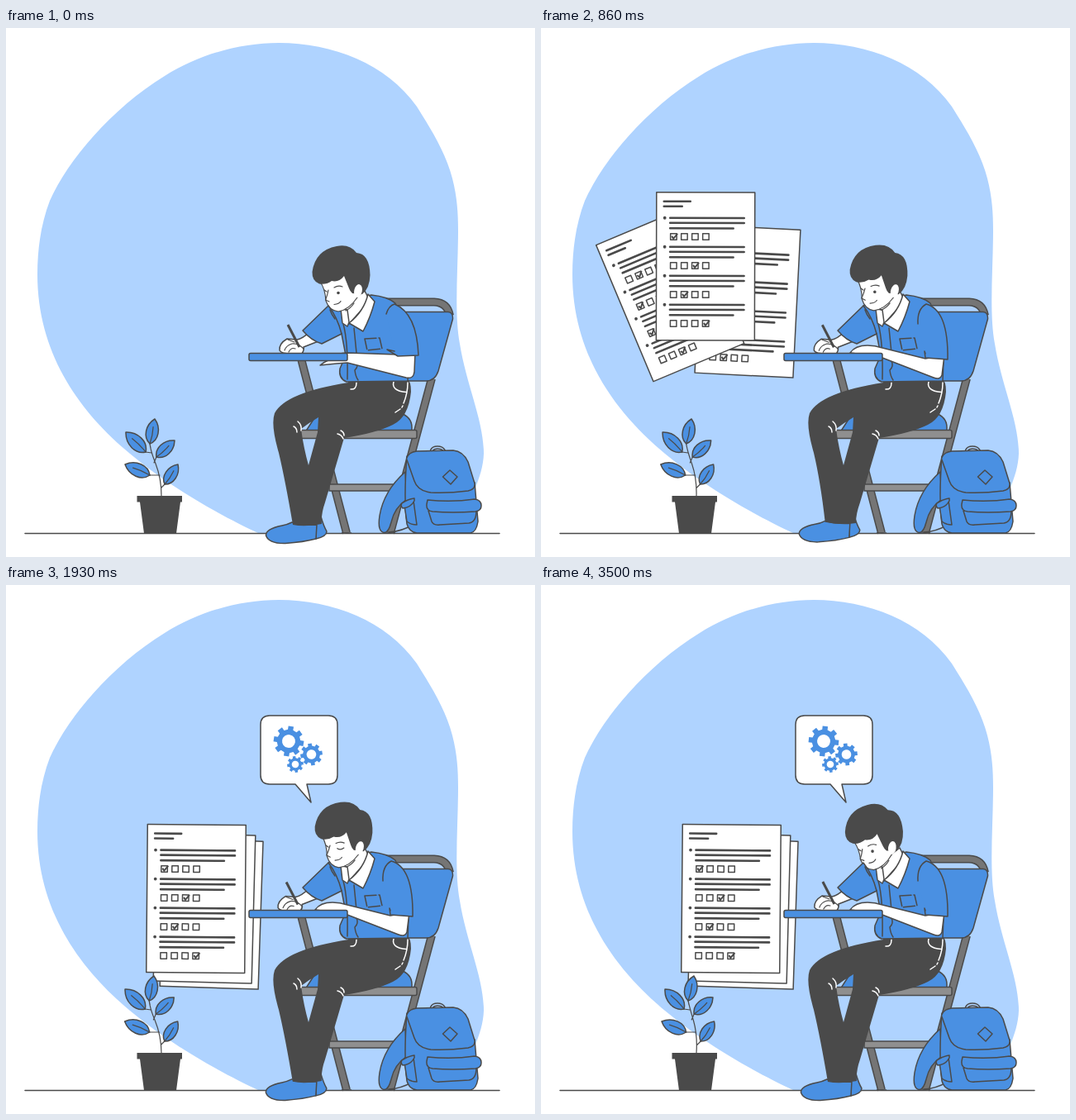
Recreate the animation shown at these times as an HTML page. Size 640 by 640 pixels, loop 3570 ms.

```html
<!DOCTYPE html>
<html lang="en">
<head>
<meta charset="utf-8">
<title>Student at a desk</title>
<style>
html, body { margin: 0; width: 100%; height: 100%; overflow: hidden; background: #fff; }
svg { display: block; width: 100vw; height: 100vh; }
.l { fill: none; stroke: #4a4a4a; stroke-width: 1.5; stroke-linecap: round; stroke-linejoin: round; }
.thin { stroke-width: 1.2; }
.b { fill: #4a90e2; }
.w { fill: #fff; }
.d { fill: #4a4a4a; }
.g { fill: #8f8f8f; }
.s { fill: none; stroke: #fff; stroke-width: 1.5; stroke-linecap: round; }
.t { fill: none; stroke: #4a4a4a; stroke-width: 2.6; stroke-linecap: round; }
.k { fill: none; stroke: #4a4a4a; stroke-width: 2; }
.tube { fill: none; stroke: #4a4a4a; stroke-width: 10; }
.tube2 { fill: none; stroke: #757575; stroke-width: 7; }
</style>
</head>
<body>
<svg viewBox="0 0 640 640">
  <path fill="#afd3ff" d="M305 611C262 591 200 557 150 515C90 465 38 395 38 298C38 265 43 235 53 209C75 160 127 98 192 58C235 31 285 18 330 18C395 18 460 43 497 95C512 119 532 150 540 182C546 205 547 225 547 245C547 290 542 345 549 382C557 432 578 475 578 515C577 545 560 570 545 611Z"/>
  <path class="l" d="M23 611.5H597"/>

  <g id="papers"></g>
  <g id="plant"></g>
  <path class="d" d="M158.5 566H213V573.5H211L206 611.5H167L162 573.5H158.5Z"/>

  <g id="bubble">
    <path class="l w" d="M319 158H390Q401 158 401 169V230Q401 241 390 241H364L369 263L350 241H319Q308 241 308 230V169Q308 158 319 158Z"/>
    <g id="gears"></g>
  </g>

  <g id="chair">
    <path class="tube" d="M455 331.5H518Q534 332 537 348M515 424L465 611M357.5 402L412 611"/>
    <path class="tube2" d="M455 331.5H518Q534 332 537 348M515 424L465 611M357.5 402L412 611"/>
    <path class="l" d="M406.5 611H417.5M459.5 611H470.5"/>
    <rect class="l g" x="391" y="552" width="84" height="8"/>
    <path class="l b" d="M470 343.5H535Q541 344 540.5 352L523 415Q519 427 508 427H470Z"/>
    <path class="l b" d="M362 489L373 472Q379 465 400 465H475Q491 470 491 483V489Z"/>
    <rect class="l g" x="355" y="486.5" width="142" height="10" rx="2"/>
  </g>

  <g id="bag">
    <path class="l b" d="M483 537Q457 560 452 590Q449 610 458 610.5Q463 610 466 598Q470 580 485 570Z"/>
    <path class="l" d="M463 610Q479 609 492 601"/>
    <path class="l" d="M513 513Q514 506 522 506Q530 506 532 513M516 512Q518 509 522 509Q527 509 529 512"/>
    <path class="l b" d="M485 518Q481 570 485 600Q488 610 497 611H562Q569 610 571 597L567 550Z"/>
    <path class="l b" d="M484.5 521Q487 513 497 512L541 511Q553 512 559 525L567 551Q568 558 559 560Q535 563 514 562Q498 560 494 548Z"/>
    <path class="l" d="M537 535L546 543L538 552L528.5 543Z"/>
    <path class="l b" d="M511 584L515 597Q517 602 525 601L560 599Q569 598 569 584Z"/>
    <path class="l b" d="M510 571Q540 574 567 570Q575 571 575 578Q575 584 568 585Q540 587 516 585Q508 584 509 576Z"/>
    <path class="l b" d="M482 578L485 597Q490 601 497 601L493 572Z"/>
    <path class="l b" d="M479 575Q486 570 494 569L494 572Q490 580 480 581Q477 578 479 575Z"/>
  </g>

  <g id="shoe">
    <path class="l b" d="M375 601L381 591Q384 602 388 609Q388 615 375 618Z"/>
    <path class="l b" d="M346 598Q340 601 334 602Q314 606 314.5 614Q318 624 338 623.5Q360 622 375 618L376 601Q360 602 346 598Z"/>
  </g>
  <path class="d" id="legs" fill-rule="evenodd"/>
  <path class="s" d="M348 482Q352 484 352 489M353 476Q358 480 357 487M401 491Q406 492 408 497M405 487Q409 489 409 493M469 428Q466 439 484 440.5M486 429Q486 442 481 454M480 457L479 459M477 461L471 465M417 437Q424 438 424 429"/>

  <path class="l b" d="M390 336L442 323Q462 325 471 333L488 375L486 427L412 428Q402 424 404 412L411 396L406 370Z"/>
  <path class="l" d="M408 358Q414 380 413 425M421 363L424 393M424 403Q427 409 422 414Q423 422 426 426"/>
  <path class="l" stroke-dasharray="14 3" d="M434 376L452 375L455 388L437 390Z"/>
  <path class="l w" d="M411 336L434 318L440 330L415 358L407 352Z"/>
  <path class="l w" d="M405 340L407 357L413 361L415 356L413 341Z"/>
  <path class="l w" d="M438 322L446 331Q441 350 432 367L415 357Q433 343 438 322Z"/>

  <g id="head">
    <path class="l w thin" d="M380 307Q386 315 387 330Q391 342 402 343Q415 341 425 326L428 304L400 296Z"/>
    <path class="d" d="M379 309.5Q370 306 370.5 295Q374 269 400 264Q416 261 424 272Q440 273 440.5 299Q440 315 431 322L419 321Q416 318 415 315L409 300Q403 308 394 306Q387 311 379 309.5Z"/>
    <ellipse class="w" cx="426" cy="318" rx="4.8" ry="8" transform="rotate(12 426 318)"/>
    <path class="l thin" d="M390 317Q389 323 386.5 329L391 331M397 314Q402 311 407 313M385 317L388 319M397 334.5Q403 334 405 330.500M421 333Q417 339 411 342"/>
    <circle class="d" id="open" cx="402" cy="320.5" r="1.8"/>
    <path class="l thin" id="shut" d="M399 320Q403 322.500 407 319"/>
  </g>

  <path class="l w" id="arm"/>
  <path class="l b" id="sleeve"/>

  <g id="hand">
    <path class="l w" d="M368 367Q359 376 352 377L340 376Q330 382 331 390Q333 394 345 394H358Q361 390 360 386L383 377Z"/>
    <path d="M341 359L355 386" stroke="#4a4a4a" stroke-width="3"/>
    <path class="l thin" d="M337 390Q339 384 346 382Q353 381 360 388M342 392Q345 386 350 388M341 377L349 380"/>
  </g>
  <path class="l b" d="M390 336L359 366Q369 378 382 382L406 370Q401 350 390 336Z"/>
  <path class="l" d="M392 341Q394 347 398 352"/>
  <rect class="l b" x="294" y="393.5" width="119" height="9" rx="2"/>
</svg>
<script>
const LOOP = 3570, TAU = 2 * Math.PI;
const $ = id => document.getElementById(id);
const put = (id, name, value) => $(id).setAttribute(name, value);
const move = (id, value) => put(id, 'transform', value);
const lerp = (a, b, k) => a + (b - a) * k;
const mix = (a, b, k) => a.map((v, i) => lerp(v, b[i], k));
const span = (t, from, to) => Math.min(1, Math.max(0, (t - from) / (to - from)));

// 0 to 1 with soft ends
function ease(t, from, to) {
  const k = span(t, from, to);
  return k * k * (3 - 2 * k);
}

// Scale from 0 to 1 that overshoots by an amount set by c
function pop(t, from, length, c) {
  const k = span(t, from, from + length) - 1;
  return 1 + (c + 1) * k ** 3 + c * k * k;
}

// Blends two paths of the same structure.
function blend(from, to, k) {
  const nums = to.match(/[\d.]+/g);
  let i = 0;
  return from.replace(/[\d.]+/g, v => lerp(+v, +nums[i++], k).toFixed(2));
}

// Exam sheets: each goes from a fan to a lower fan to a stack; poses are centre and angle
const SHEETS = [
  { ticks: [0, 2, 3, 1], fan: [250, 267.4, 2.9], low: [250, 397.5, 2.9], stack: [248.6, 397.7, 1.9] },
  { ticks: [1, 0, 0, 2], fan: [157.9, 277.4, -29.6], low: [154.4, 369.2, -15.6], stack: [240, 391, 1.5] },
  { ticks: [0, 2, 1, 3], fan: [202, 256, 5.3], low: [196, 322.5, -5.3], stack: [230, 379.5, .5] }
];

function sheet(ticks) {
  let s = '<rect class="l w" width="119" height="179"/><path class="t" d="M9 11H41M9 17H31"/>';
  ticks.forEach((tick, q) => {
    const y = 31 + 35 * q;
    s += `<circle class="d" cx="10" cy="${y}" r="1.9"/>` +
      `<path class="t" d="M16.5 ${y}H106M16.5 ${y + 6}H106M16.5 ${y + 12.5}H93"/>`;
    for (let i = 0; i < 4; i++)
      s += `<rect class="l" x="${17 + 13 * i}" y="${y + 19}" width="7.5" height="7.5"/>`;
    s += `<path class="k" d="M${18.5 + 13 * tick} ${y + 22}l2 3l5 -6"/>`;
  });
  return s;
}
$('papers').innerHTML = SHEETS.map((p, i) =>
  `<g id="paper${i}"><g transform="translate(-59.5 -89.5)">${sheet(p.ticks)}</g></g>`).join('');

function drawSheets(t) {
  const fall = ease(t, 640, 1090), gather = ease(t, 1190, 1880);
  SHEETS.forEach(({ fan, low, stack }, i) => {
    const [x, y, a] = mix(mix(fan, low, fall), stack, gather);
    // A sheet that turns further swings lower on its way
    const dip = .5 * Math.abs(stack[2] - low[2]) * Math.sin(Math.PI * gather);
    move('paper' + i, `translate(${x} ${y + dip}) rotate(${a}) scale(${pop(t, 100 + 100 * i, 340, 1.2)})`);
  });
}

// Gears: centre, radius, turn direction
const GEARS = [[342, 189, 18.5, 1], [369.5, 205, 13.5, -1], [350, 217, 10, -1]];

function gear(r) {
  const pts = [], hole = r * .43;
  for (let i = 0; i < 8; i++)
    for (const [turn, k] of [[-13, .77], [-10, 1], [10, 1], [13, .77]]) {
      const a = (i * 45 + turn) * Math.PI / 180;
      pts.push((r * k * Math.cos(a)).toFixed(2) + ' ' + (r * k * Math.sin(a)).toFixed(2));
    }
  return `M${pts.join('L')}ZM${hole} 0A${hole} ${hole} 0 1 0 ${-hole} 0A${hole} ${hole} 0 1 0 ${hole} 0Z`;
}
$('gears').innerHTML = GEARS.map((g, i) =>
  `<path id="gear${i}" class="b" fill-rule="evenodd" d="${gear(g[2])}"/>`).join('');

function drawBubble(t) {
  move('bubble', `translate(354.5 290) scale(${pop(t, 980, 440, 1.9)}) translate(-354.5 -290)`);
  GEARS.forEach(([x, y, , dir], i) =>
    move('gear' + i, `translate(${x} ${y}) rotate(${dir * (12 + (t - 1430) * .084)})`));
}

// Leaves at rest: base, joint on the stem, tip, and share of the sway
const LEAVES = [
  { base: [174, 503], joint: [175, 508], tip: [180, 473], share: 1 },
  { base: [169, 513], joint: [176, 514], tip: [145, 489], share: 1 },
  { base: [182, 519], joint: [179, 526], tip: [204, 499], share: .8 },
  { base: [174, 541], joint: [186, 541], tip: [144, 528], share: .4 },
  { base: [192, 552], joint: [188, 556], tip: [208, 528], share: .3 }
];
$('plant').innerHTML = '<path class="l thin" id="stem"/>' + LEAVES.map((_, i) =>
  `<path class="l b" id="leaf${i}"/><path class="l thin" id="vein${i}"/>`).join('');

function drawPlant(t) {
  const s = 4 * ease(t, 0, 640) - 10 * ease(t, 640, 1430) + 7 * ease(t, 1430, 2200) + 4 * ease(t, 2200, 3500);
  let stem = `M188 566Q${188 + s * .3} 545 ${181 + s * .7} 527Q${175 + s} 512 ${174 + s * .8} 503`;
  LEAVES.forEach(({ base, joint, tip, share }, i) => {
    const shift = s * share, bx = base[0] + shift * .8, by = base[1];
    const dx = tip[0] + shift - bx, dy = tip[1] - by, len = Math.hypot(dx, dy), w = len * .32;
    const at = (along, side) =>
      `${bx + dx * along - dy / len * side} ${by + dy * along + dx / len * side}`;
    put('leaf' + i, 'd', `M${at(0, 0)}C${at(.2, w)} ${at(.7, w)} ${at(1, 0)}` +
      `C${at(.7, -w)} ${at(.2, -w)} ${at(0, 0)}Z`);
    put('vein' + i, 'd', `M${at(0, 0)}Q${at(.35, 1.5)} ${at(.68, 0)}`);
    stem += `M${bx} ${by}L${joint[0] + shift * .8} ${joint[1]}`;
  });
  put('stem', 'd', stem);
}

// Arm below the desk, then resting on it
const ARM = ['M380 408Q385 404 390 402Q400 393 413 393L472 395L495 392L494 416Q493 425 484 423L413 405L400 406Z',
  'M374 393Q380 384 395 384Q404 384 413 387L465 400L488 396L485 420Q483 426 475 423L413 399L400 396Z'];
const SLEEVE = ['M460 346Q463 336 470 334Q497 345 499 396L474 397L461 389L470 391',
  'M456 358Q455 340 466 334Q493 341 492 401L465 399L464 391L465 394'];

const legs = tap => 'M414 429Q338 441 325 466Q320 480 330 514' +
  `Q338 548 ${347 - 3 * tap} ${601 - 3 * tap}Q361 ${604 - 2 * tap} ${382 - tap} ${600 - tap}` +
  'Q381 588 386 574L409 496Q448 490 468 480Q487 471 490 440Q490 427 486 426L414 428Z' +
  'M378 471Q366 478 357 485Q360 508 366 529L377 489Z';

function drawStudent(t) {
  const reach = ease(t, 50, 600);
  put('arm', 'd', blend(...ARM, reach));
  put('sleeve', 'd', blend(...SLEEVE, reach));

  const tap = .55 * (1 - Math.cos(2 * TAU * t / LOOP));
  put('legs', 'd', legs(tap));
  move('shoe', `translate(${-2 * tap} ${-1.5 * tap})`);

  const up = ease(t, 0, 640) - ease(t, 2000, 2430);
  move('head', `translate(${up} 0) rotate(${3 * up - 4 * ease(t, 2430, 3500)} 425 335)`);
  const blink = t > 1850 && t < 2010;
  put('open', 'visibility', blink ? 'hidden' : 'visible');
  put('shut', 'visibility', blink ? 'visible' : 'hidden');

  const pen = Math.cos(TAU * t / 205) - 1;
  move('hand', `translate(${pen} ${-pen * .3})`);
}

const start = performance.now();
function frame() {
  const t = (performance.now() - start) % LOOP;
  drawPlant(t);
  drawSheets(t);
  drawBubble(t);
  drawStudent(t);
  requestAnimationFrame(frame);
}
frame();
</script>
</body>
</html>
```
